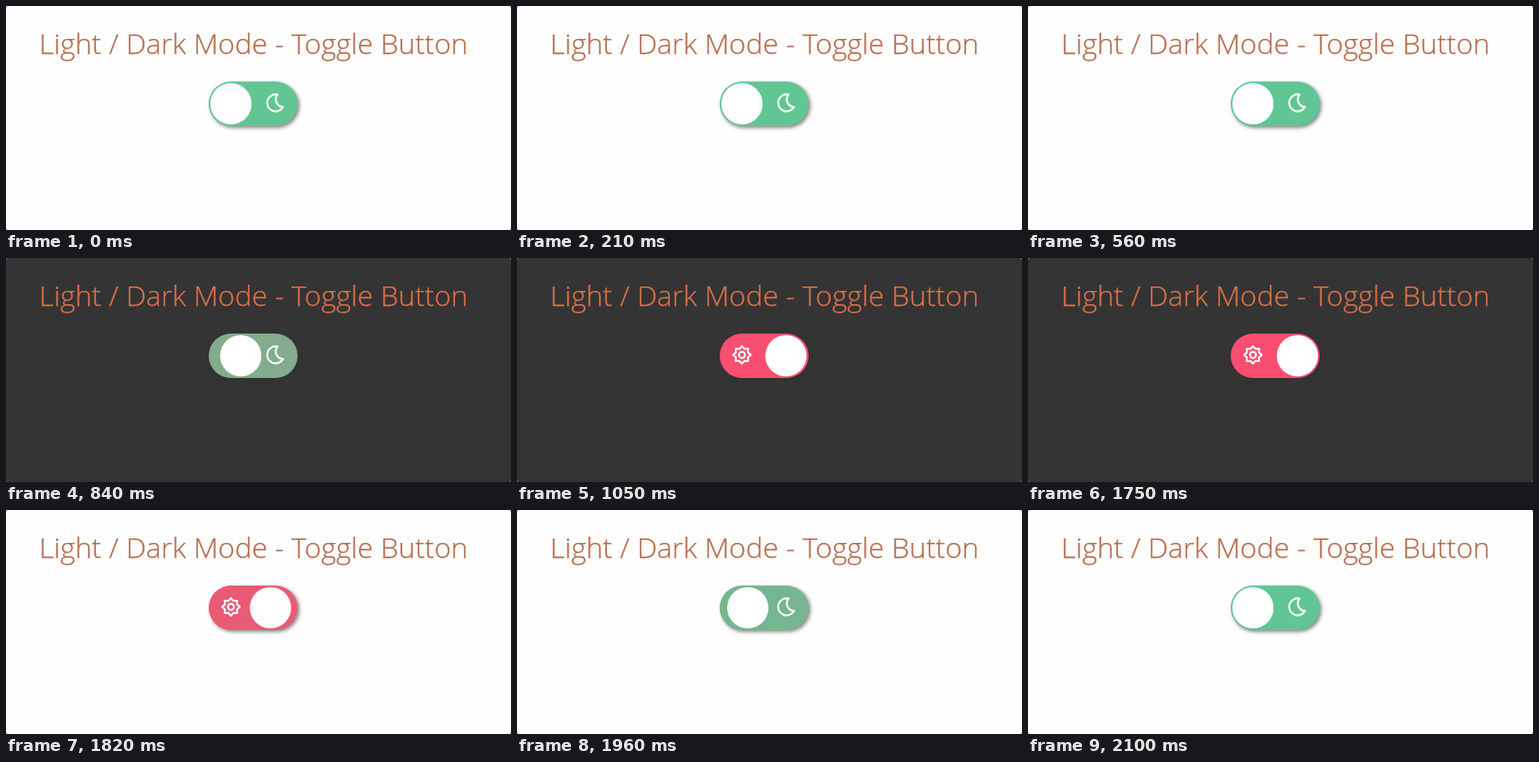
Animation, 568 px wide and 252 px high, one loop 2730 ms. Source, as an HTML page:

```html
<!DOCTYPE html>
<html lang="en">
<head>
<meta charset="utf-8">
<title>Toggle Button</title>
<style>
  html, body { margin: 0; height: 100%; overflow: hidden; background: #8a8a8a; }
  svg { display: block; width: 568px; height: 252px; }
  text { font: 300 32.1px "Open Sans", sans-serif; text-anchor: middle; stroke-width: .25; }
  #track { filter: drop-shadow(2.2px 2.2px 2.2px rgba(48, 48, 48, .6)); }
  .icon { fill: none; stroke: #fff; stroke-width: 2.1; stroke-linejoin: round; }
</style>
</head>
<body>
<svg viewBox="0 0 568 252">
  <rect id="page" width="568" height="252" rx="2.5"/>
  <text id="title" x="278.3" y="54">Light / Dark Mode - Toggle Button</text>
  <rect id="track" x="228" y="85" width="100" height="50" rx="25"/>
  <g class="icon">
    <path id="sun"/>
    <circle cx="253" cy="109" r="3.4"/>
    <path d="M305.5 99.600A9.600 9.600 0 1 0 311.700 113.600A8.500 8.500 0 0 1 305.500 99.600Z"/>
  </g>
  <circle id="knob" cy="110" r="23.2" fill="#fff"/>
</svg>
<script>
const LOOP = 2730, STEP = 70, DURATION = 300;
const DARK_AT = 790, LIGHT_AT = 1787;
const GREEN = [97, 198, 148], PINK = [250, 78, 112];
const $ = id => document.getElementById(id);
const page = $('page'), title = $('title'), track = $('track'), knob = $('knob');

// Eight-pointed star around the sun's ring
const points = Array.from({ length: 16 }, (_, i) => {
  const angle = i * Math.PI / 8, r = i % 2 ? 7.4 : 9.9;
  return [253 + r * Math.sin(angle), 109 - r * Math.cos(angle)];
});
$('sun').setAttribute('d', 'M' + points.join('L') + 'Z');

// CSS "ease": cubic-bezier(.25, .1, .25, 1)
function ease(x) {
  if (x <= 0) return 0;
  if (x >= 1) return 1;
  let lo = 0, hi = 1;
  for (let i = 0; i < 20; i++) {
    const s = (lo + hi) / 2;
    if (.75 * s * (1 - s) + s ** 3 < x) lo = s; else hi = s;
  }
  return .3 * lo * (1 - lo) ** 2 + 3 * lo * lo * (1 - lo) + lo ** 3;
}

function draw(now) {
  const t = Math.floor(now % LOOP / STEP) * STEP;
  const dark = t >= DARK_AT && t < LIGHT_AT;
  const on = ease((t - DARK_AT) / DURATION) - ease((t - LIGHT_AT) / DURATION);
  const color = GREEN.map((c, i) => Math.round(c + (PINK[i] - c) * on));
  const ink = dark ? '#de714a' : '#b26b4d';

  page.setAttribute('fill', dark ? '#343434' : '#fefefe');
  title.setAttribute('fill', ink);
  title.setAttribute('stroke', ink);
  track.setAttribute('fill', `rgb(${color})`);
  knob.setAttribute('cx', 253 + 50 * on);
  requestAnimationFrame(() => draw(performance.now() - start));
}

const start = performance.now();
draw(0);
</script>
</body>
</html>
```
